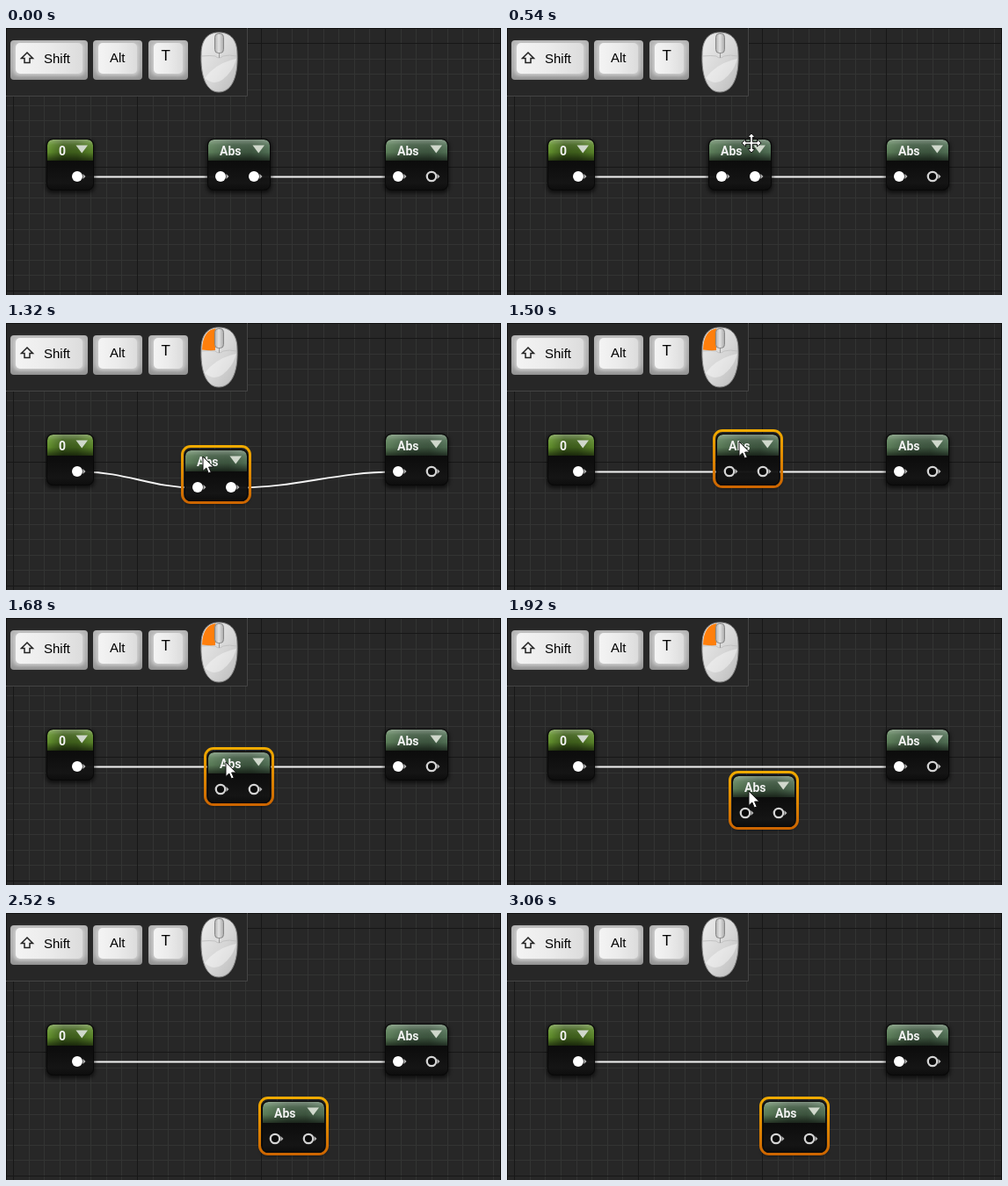
An HTML page that plays this animation: 563 px wide and 304 px high, repeating every 3.12 s.

```html
<!DOCTYPE html>
<html lang="en">
<head>
<meta charset="utf-8">
<title>Shake a node loose</title>
<style>
  html, body { margin: 0; width: 100%; height: 100%; overflow: hidden; background: #262626; }
  svg { display: block; width: 563px; height: 304px; }
  .key { font: 15px "Liberation Sans", Arial, sans-serif; fill: #000; }
  .title { font: bold 14px Roboto, sans-serif; fill: #f2f2f2; }
  .tip { font: 15px Roboto, sans-serif; letter-spacing: .32px; fill: #111; }
  .hint { font-size: 14px; fill: #585858; }
  .wire { fill: none; stroke: #f4f4f4; stroke-width: 1.8; }
</style>
</head>
<body>
<svg viewBox="0 0 563 304" xmlns="http://www.w3.org/2000/svg">
  <defs>
    <linearGradient id="keySide" x2="0" y2="1">
      <stop offset="0" stop-color="#b4b4b4"/><stop offset=".7" stop-color="#a8a8a8"/><stop offset="1" stop-color="#929292"/>
    </linearGradient>
    <linearGradient id="keyTop">
      <stop offset="0" stop-color="#f4f4f4"/><stop offset=".5" stop-color="#ebebeb"/><stop offset="1" stop-color="#dcdcdc"/>
    </linearGradient>
    <linearGradient id="mouseSkin" x2="1" y2="1">
      <stop offset="0" stop-color="#ededed"/><stop offset=".55" stop-color="#d6d6d6"/><stop offset="1" stop-color="#bababa"/>
    </linearGradient>
    <linearGradient id="wheel">
      <stop offset="0" stop-color="#b0b0b0"/><stop offset=".45" stop-color="#e2e2e2"/><stop offset="1" stop-color="#a8a8a8"/>
    </linearGradient>
    <linearGradient id="green">
      <stop offset="0" stop-color="#699a30"/><stop offset=".35" stop-color="#3f5f1c"/><stop offset=".65" stop-color="#42641d"/><stop offset="1" stop-color="#5f8c2c"/>
    </linearGradient>
    <linearGradient id="sage">
      <stop offset="0" stop-color="#62865f"/><stop offset=".4" stop-color="#425c44"/><stop offset=".7" stop-color="#3f5841"/><stop offset="1" stop-color="#56765a"/>
    </linearGradient>
    <linearGradient id="gloss" x2="0" y2="1">
      <stop offset="0" stop-color="#fff" stop-opacity=".32"/><stop offset=".25" stop-color="#fff" stop-opacity=".08"/>
      <stop offset=".6" stop-color="#000" stop-opacity=".06"/><stop offset="1" stop-color="#000" stop-opacity=".6"/>
    </linearGradient>
    <linearGradient id="body" x2="0" y2="1">
      <stop offset=".4" stop-color="#0b0b0b"/><stop offset=".85" stop-color="#151515"/><stop offset="1" stop-color="#0c0c0c"/>
    </linearGradient>
    <linearGradient id="select" x2="0" y2="1">
      <stop offset="0" stop-color="#f0aa00"/><stop offset="1" stop-color="#cc6500"/>
    </linearGradient>
    <filter id="soft" x="-20%" y="-20%" width="140%" height="140%"><feGaussianBlur stdDeviation="2"/></filter>
  </defs>

  <rect width="563" height="304" fill="#272727"/>
  <path id="minor" stroke="#333433"/>
  <path id="major" stroke="#171717"/>
  <path d="M0 .5H563M.5 0V304M562.5 0V304" stroke="#101010"/>

  <path id="wireA" class="wire"/>
  <path id="wireB" class="wire"/>
  <g id="nodes"></g>

  <rect width="274" height="77" fill="#272727"/>
  <path d="M0 77.5H274.5V0" fill="none" stroke="#444"/>
  <path d="M0 .5H274M.5 0V77" stroke="#101010"/>
  <g id="keys"></g>
  <path d="M24 28L30.5 34.5H27V39.5H21V34.5H17.5Z" fill="none" stroke="#222" stroke-width="1.5"/>

  <path d="M242 5C256 5 263 14 263 30C264 53 258 73 242 73C227 73 221 53 222 30C222 14 229 5 242 5Z" fill="url(#mouseSkin)" stroke="#858585"/>
  <path d="M226 57Q238 40 262 35Q258 50 246 59Q236 66 226 57Z" fill="#fff" opacity=".4"/>
  <path d="M223 32Q232 31 238 32Q242 36 247 32Q254 30 262 32" fill="none" stroke="#c2c2c2"/>
  <path id="button" d="M240 6C229 7 223.5 15 223 30.5Q231 31.5 238 31V6Z" fill="#ff7f0c"/>
  <rect x="237.5" y="6.5" width="10" height="22" rx="4" fill="url(#wheel)" stroke="#868686"/>
  <path d="M242.5 29V34" stroke="#999"/>

  <g id="tooltip">
    <rect x="264" y="151" width="185" height="65" fill="#090909"/>
    <rect x="266" y="153" width="181" height="61" fill="#f0f0f0"/>
    <text class="tip" x="277" y="178">Abs</text>
    <text class="tip hint" x="277" y="200">hold (Ctrl + Alt) for more</text>
  </g>

  <path id="arrow" d="M0 0V16.5L3.8 13L6.4 19L9.2 17.8L6.6 12H11.8Z" fill="#fff" stroke="#111" stroke-width="1"/>
  <path id="cross" d="M0 -11L4 -6.5H1.3V-1.3H6.5V-4L11 0L6.5 4V1.3H1.3V6.5H4L0 11L-4 6.5H-1.3V1.3H-6.5V4L-11 0L-6.5 -4V-1.3H-1.3V-6.5H-4Z" fill="#fff" stroke="#111" stroke-width="1"/>
</svg>
<script>
const LOOP = 3120, STEP = 60, GRID = 8.8125;
const $ = id => document.getElementById(id);

// Background grid
function gridPath(gap) {
  let d = '';
  for (let x = 8; x < 563; x += gap) d += `M${Math.round(x) + .5} 0V304`;
  for (let y = 17; y < 304; y += gap) d += `M0 ${Math.round(y) + .5}H563`;
  return d;
}
$('minor').setAttribute('d', gridPath(GRID * 2));
$('major').setAttribute('d', gridPath(GRID * 16));

// Keyboard keys
function key(x, w, label, tx, ty, size) {
  return `<rect x="${x}" y="14" width="${w}" height="45" rx="4" fill="url(#keySide)"/>
    <rect x="${x + 4}" y="17" width="${w - 8}" height="37" rx="5" fill="#d2d2d2" filter="url(#soft)"/>
    <rect x="${x + 6}" y="17" width="${w - 12}" height="35" rx="5" fill="url(#keyTop)"/>
    <text class="key" x="${tx}" y="${ty}" style="font-size:${size}px">${label}</text>`;
}
$('keys').innerHTML = key(5, 88, 'Shift', 43, 39.5, 15) + key(99, 56, 'Alt', 118, 39, 15) + key(162, 45, 'T', 176.5, 37, 17);

// Graph nodes
function pin(x, on) {
  const dot = on ? '<circle r="6" fill="#fff"/>' : '<circle r="5.2" fill="#0a0a0a" stroke="#d4d4d4" stroke-width="2.3"/>';
  return `<g transform="translate(${x} 43)"><path d="M6.5 -3L9.5 0L6.5 3Z" fill="#b4b4b4"/>${dot}</g>`;
}
function node(id, x, w, label, tint, pins) {
  return `<g id="${id}" transform="translate(${x} 126)">
    <rect x="-1" y="1" width="${w + 2}" height="61" rx="8" opacity=".6" filter="url(#soft)"/>
    <rect class="ring" x="-2.5" y="-3.5" width="${w + 5}" height="64" rx="9.5" fill="none" stroke="url(#select)" stroke-width="3" visibility="hidden"/>
    <rect width="${w}" height="59" rx="7" fill="url(#body)" fill-opacity=".92"/>
    ${['url(#' + tint + ')', 'url(#gloss)'].map(f => `<path d="M1 25V8Q1 1 8 1H${w - 8}Q${w - 1} 1 ${w - 1} 8V25Z" fill="${f}"/>`).join('')}
    <rect x=".5" y=".5" width="${w - 1}" height="58" rx="7" fill="none" stroke="#080808"/>
    <text class="title" x="14" y="19">${label}</text>
    <path d="M${w - 20.5} 7.5H${w - 7}L${w - 13.75} 16.5Z" fill="#d0d8cc"/>
    <g class="pins">${pins}</g></g>`;
}
$('nodes').innerHTML = node('zero', 46, 54, '0', 'green', pin(35, true))
  + node('end', 431, 72, 'Abs', 'sage', pin(15, true) + pin(53, false))
  + node('mid', 229, 72, 'Abs', 'sage', '');
const ring = $('mid').querySelector('.ring'), midPins = $('mid').querySelector('.pins');

// Node path: time, then offset in grid cells
const drag = [
  [0, 0, 0], [1080, -1, 1], [1200, -3, 1], [1260, -4, 2], [1320, -3, 2], [1380, 2, -4],
  [1440, 3, -3], [1500, 1, 0], [1560, 0, 2], [1620, 0, 3], [1740, 0, 4], [1800, 1, 5],
  [1860, 2, 5], [1920, 3, 6], [1980, 4, 7], [2040, 5, 8], [2100, 6, 9], [2160, 7, 10]
];
// Pointer path: time, x, y, shape
const pointer = [
  [0, 0, 0, ''], [60, 517, 62, 'arrow'], [120, 486, 76, 'arrow'], [180, 446, 92, 'arrow'],
  [240, 400, 107, 'arrow'], [300, 356, 120, 'arrow'], [360, 322, 131, 'arrow'], [420, 298, 135, 'cross'],
  [480, 284, 134, 'cross'], [540, 278, 131, 'cross'], [600, 281, 127, 'cross'], [1020, 266, 131, 'arrow'],
  [1080, 241, 143, 'arrow'], [1200, 224, 143, 'arrow'], [1260, 215, 152, 'arrow'], [1320, 224, 152, 'arrow'],
  [1380, 270, 100, 'arrow'], [1440, 279, 108, 'arrow'], [1500, 264, 135, 'arrow'], [1560, 253, 155, 'arrow'],
  [1620, 250, 164, 'arrow'], [1740, 252, 171, 'arrow'], [1800, 260, 180, 'arrow'], [1860, 267, 188, 'arrow'],
  [1920, 275, 197, 'arrow'], [1980, 284, 206, 'arrow'], [2040, 293, 215, 'arrow'], [2100, 302, 225, 'arrow'],
  [2160, 310, 233, 'arrow'], [2220, 313, 236, 'cross'], [2280, 327, 231, 'cross'], [2340, 374, 216, 'arrow'],
  [2400, 450, 194, 'arrow'], [2460, 531, 173, 'arrow'], [2520, 0, 0, '']
];

const at = (table, t) => table.findLast(row => row[0] <= t);
const within = (t, from, to) => t >= from && t < to;
const show = (el, on) => el.setAttribute('visibility', on ? 'visible' : 'hidden');

function wire(x1, y1, x2, y2) {
  const bend = (x2 - x1) * .37;
  return `M${x1} ${y1}C${x1 + bend} ${y1} ${x2 - bend} ${y2} ${x2} ${y2}`;
}

function draw(t) {
  const [, gx, gy] = at(drag, t);
  const x = Math.round(229.4 + gx * GRID), dy = Math.round(gy * GRID);
  const linked = t < 1440, y = 169.5;
  $('mid').setAttribute('transform', `translate(${x} ${126 + dy})`);
  midPins.innerHTML = pin(15, linked) + pin(53, linked);
  show(ring, t >= 1080);
  $('wireA').setAttribute('d', linked ? wire(89, y, x + 10, y + dy) : wire(89, y, 441, y));
  $('wireB').setAttribute('d', linked ? wire(x + 62, y + dy, 441, y) : '');

  show($('tooltip'), within(t, 720, 1020));
  show($('button'), within(t, 900, 2220) || within(t, 3000, 3060));

  const [, px, py, shape] = at(pointer, t);
  for (const name of ['arrow', 'cross']) {
    show($(name), name === shape);
    $(name).setAttribute('transform', `translate(${px} ${py})`);
  }
}

const start = performance.now();
let last = -1;
function tick() {
  const t = Math.floor((performance.now() - start) % LOOP / STEP) * STEP;
  if (t !== last) draw(last = t);
  requestAnimationFrame(tick);
}
tick();
</script>
</body>
</html>
```
